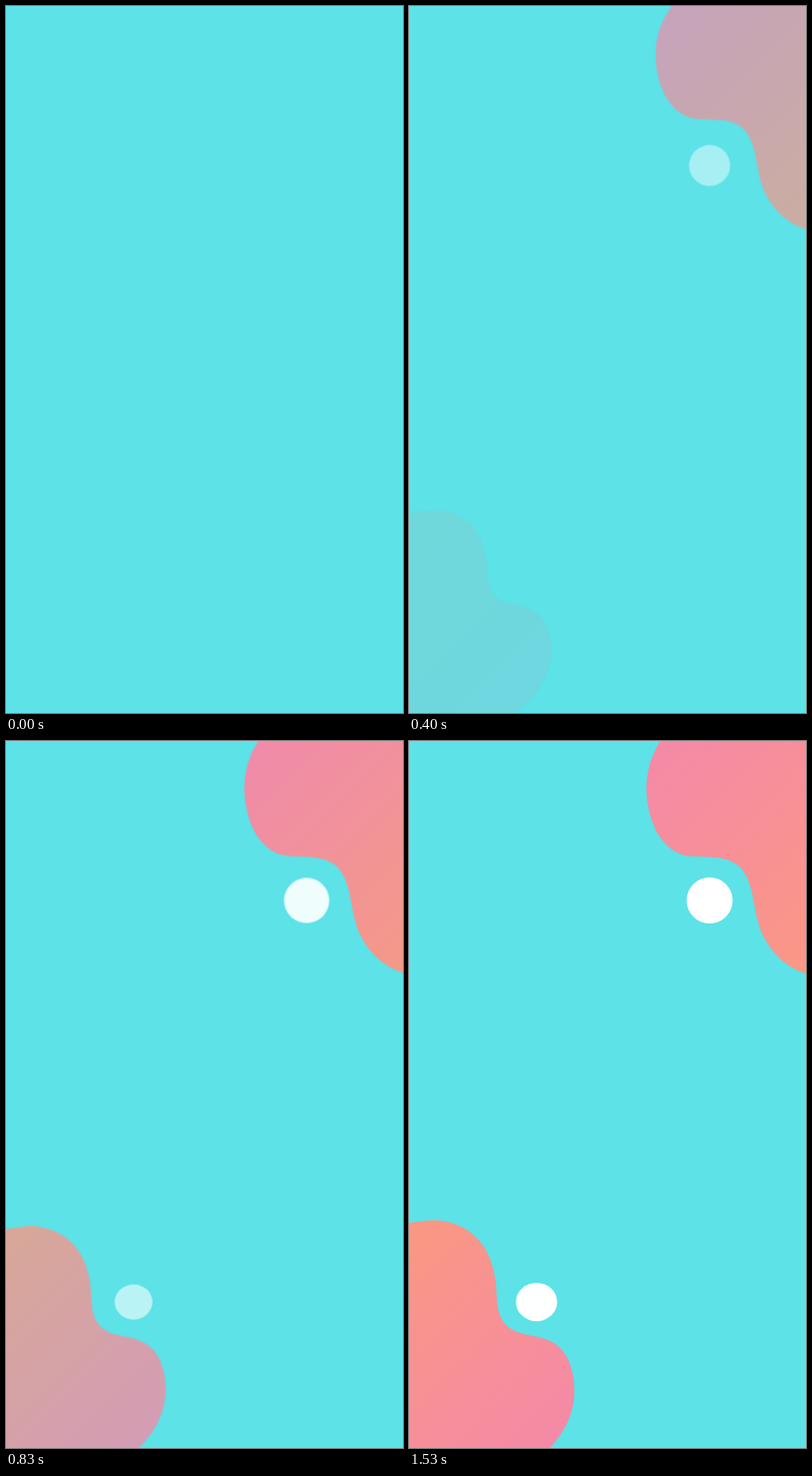
An HTML page for the animation above (6.26 s loop, 414 by 736 pixels).

```html
<!DOCTYPE html>
<html lang="en">
<head>
<meta charset="utf-8">
<title>Blobs</title>
<style>
  html, body { margin: 0; width: 100%; height: 100%; overflow: hidden; background: #5ce2e7; }
  svg { display: block; width: 100%; height: 100%; }

  /* Each part grows and fades in over 1200 ms with a cubic ease-out, 175 ms apart. */
  .pop { animation: 6260ms infinite cubic-bezier(.3333, 1, .6667, 1); }
  .top-blob { transform-origin: 408px 78px; animation-name: pop1; }
  .top-dot { transform-origin: 313.5px 166px; animation-name: pop2; }
  .low-blob { transform-origin: 36px 645px; animation-name: pop3; }
  .low-dot { transform-origin: 133px 584px; animation-name: pop4; }

  @keyframes pop1 {
    0% { opacity: 0; transform: scale(.8); }
    19.169%, 100% { opacity: 1; transform: none; }
  }
  @keyframes pop2 {
    0%, 2.796% { opacity: 0; transform: scale(.8); }
    21.965%, 100% { opacity: 1; transform: none; }
  }
  @keyframes pop3 {
    0%, 5.591% { opacity: 0; transform: scale(.8); }
    24.76%, 100% { opacity: 1; transform: none; }
  }
  @keyframes pop4 {
    0%, 8.466% { opacity: 0; transform: scale(.8); }
    27.636%, 100% { opacity: 1; transform: none; }
  }

  /* The stage stays empty for the first 70 ms. */
  .stage { animation: blank 6260ms infinite step-end; }
  @keyframes blank {
    0% { visibility: hidden; }
    1.07%, 100% { visibility: visible; }
  }
</style>
</head>
<body>
<svg viewBox="0 0 414 736" preserveAspectRatio="none">
  <defs>
    <linearGradient id="warm-top" gradientUnits="userSpaceOnUse" x1="245" y1="40" x2="425" y2="220">
      <stop offset="0" stop-color="#f58aa6"/>
      <stop offset="1" stop-color="#fa9785"/>
    </linearGradient>
    <linearGradient id="warm-low" gradientUnits="userSpaceOnUse" x1="-10" y1="540" x2="160" y2="710">
      <stop offset="0" stop-color="#fa9785"/>
      <stop offset="1" stop-color="#f58aa6"/>
    </linearGradient>
  </defs>
  <g class="stage">
    <path class="pop top-blob" fill="url(#warm-top)" d="M283-26C275-17 268-9 262 0C252 16 247.5 33 247.5 50
      C247.5 68 254 91 264 103C273 114 282 119 294 120C304 121 309 120 321 121.5
      C345 124 352 137 357 155C361 172 362 190 371 206C380 223 396 237 414 242L440 248V-26Z"/>
    <circle class="pop top-dot" cx="313.5" cy="166" r="24" fill="#fff"/>
    <path class="pop low-blob" fill="url(#warm-low)" d="M-20 509C-13 506 -6 503.5 0 502C9 500 18 499 27 499
      C48 499.500 67 509 79 528C88 543 91 560 91.500 578C92 596 97 607 108 613
      C121 620 139 618 153 628C167 638 172.500 658 172.500 676C172.500 700 162 720 147 736
      C139 745 131 751 121 757L106 766H-20Z"/>
    <ellipse class="pop low-dot" cx="133" cy="584" rx="21.5" ry="20" fill="#fff"/>
  </g>
</svg>
</body>
</html>
```
